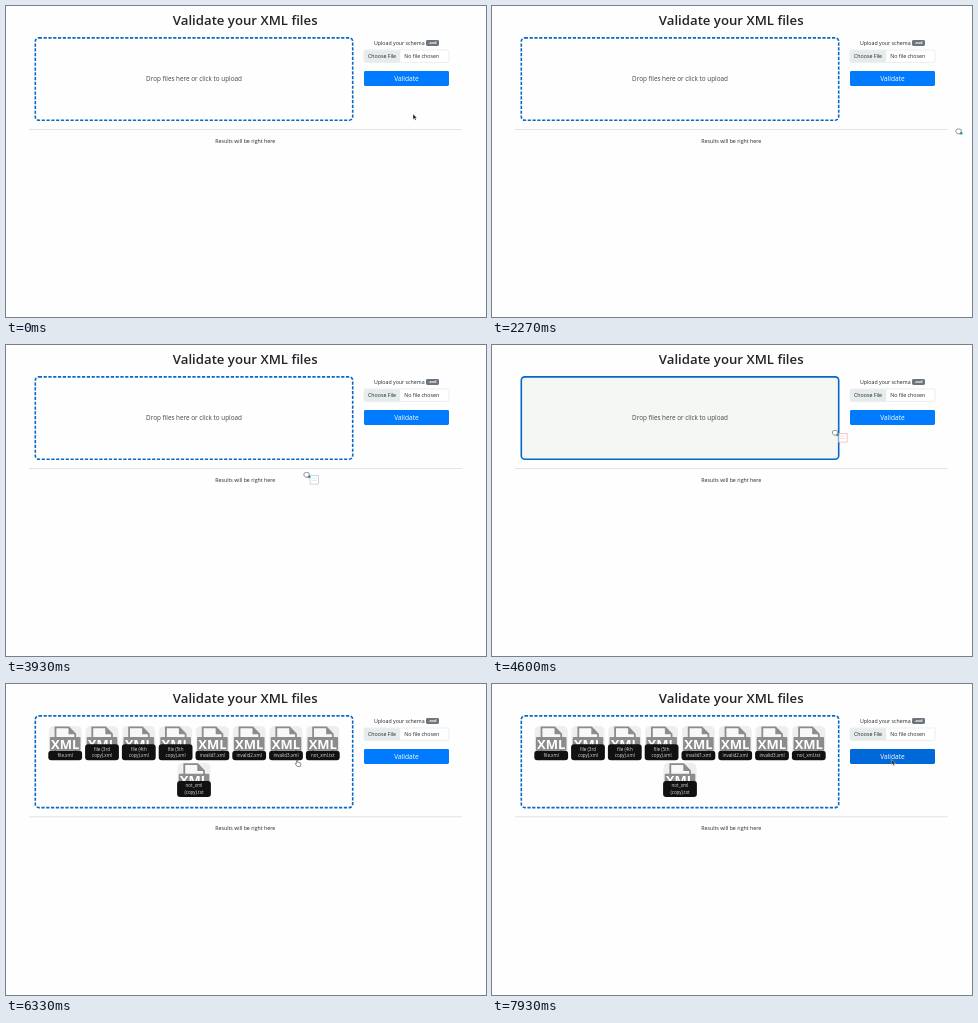
Write an HTML page that moves like this. It is 480x311 px and loops after 8000 ms.

```html
<!DOCTYPE html>
<html lang="en">
<head>
<meta charset="utf-8">
<title>Validate XML</title>
<style>
  html, body { margin: 0; width: 100%; height: 100%; overflow: hidden; background: #fefefe; }
  svg { display: block; width: 100vw; height: 100vh; }
  text { font-family: "Open Sans", "Noto Sans", sans-serif; font-size: 5.25px; fill: #212529; }
  .mid { text-anchor: middle; }
  .title { font-size: 13.2px; font-weight: 600; }
  .hint { font-size: 6.35px; fill: #444; }
  .badge { font-size: 4.1px; font-weight: 700; fill: #fff; }
  .action { font-size: 6.6px; fill: #fff; }
  .name { font-size: 4.5px; fill: #ddd; }
  .xml { font-size: 13px; font-weight: 700; fill: #fff; }
</style>
</head>
<body>
<svg viewBox="0 0 480 311">
  <text class="mid title" x="239.2" y="18.6">Validate your XML files</text>

  <rect id="zone" x="29.3" y="31.9" width="317.4" height="82.4" rx="3.5" stroke="#0668c8" stroke-width="1.6"/>
  <text id="hint" class="mid hint" x="188" y="75.3">Drop files here or click to upload</text>
  <g id="files"></g>

  <g id="below">
    <path d="M23 123.5H456" stroke="#e4e4e4"/>
    <text class="mid" x="239.2" y="137.2">Results will be right here</text>
  </g>

  <text x="368" y="39">Upload your schema</text>
  <rect x="420" y="34" width="13" height="6" rx="1.4" fill="#6c757d"/>
  <text class="mid badge" x="426.5" y="38.4">.xsd</text>
  <rect x="358" y="44" width="85" height="12.4" rx="1.5" fill="#fff" stroke="#dde1e5" stroke-width=".6"/>
  <rect x="358.2" y="44.2" width="36" height="12" rx="1.2" fill="#e6ebec"/>
  <text x="362" y="52.1">Choose File</text>
  <text x="398.3" y="52.1">No file chosen</text>
  <rect id="button" x="358" y="65" width="85" height="15" rx="1.4"/>
  <text class="mid action" x="400.5" y="74.8">Validate</text>

  <g id="cursor">
    <g id="ghost">
      <rect x="4" y="2.3" width="8.6" height="8.8" fill="#fff" fill-opacity=".75" stroke-width=".6"/>
      <path d="M5.5 5H11M5.5 7.5H11" stroke-width=".5" opacity=".6"/>
    </g>
    <path id="arrow" d="M0 0V5.4L1.3 4.3 2.2 6.2 3.2 5.7 2.3 3.9H4Z" fill="#222" stroke="#fff" stroke-width=".35"/>
    <path id="hand" d="M-.6 .2Q0 -.6 .6 .2V2.2L3 2.8Q4 3 3.8 4.2L3.2 6.4H.1L-1.9 3.8Q-1.9 2.9 -.6 3.6Z" fill="#fff" stroke="#444" stroke-width=".6"/>
    <g id="fist">
      <path d="M-1.8 .2Q-.8 -.8 .3 -.4Q1.8 -1 3.2 .3V3L2.4 4.2H-.6L-2.2 2.2Z" fill="#fff" stroke="#666" stroke-width=".7"/>
      <circle cx="3.2" cy="3.8" r="1.4" fill="#2a9dab"/>
    </g>
  </g>
</svg>
<script>
const LOOP = 8000, STEP = 200 / 3, LEG = 460;
const LEAVE = 1270, GRAB = 2260, POINT = 5390, DROP = 5900;
const $ = id => document.getElementById(id);
const show = (id, on) => $(id).setAttribute("visibility", on ? "visible" : "hidden");

// Pointer stops: arrival time, x, y
const stops = [
  [0, 407, 108], [430, 240, 14], [600, 32, 66], [870, 213, 131], [1270, 444, 172],
  [2270, 466, 123.5], [2600, 372, 108], [3070, 276, 91.5], [3930, 300, 128], [4400, 362, 104],
  [4600, 342.5, 86], [5000, 166, 74], [5400, 242, 73.5], [6330, 291, 76], [6700, 436, 50],
  [7250, 103, 62], [7860, 399.5, 75.5]
];

// Rest at each stop, then ease to the next in at most LEG ms
function pointer(t) {
  const i = stops.findIndex(s => s[0] > t);
  if (i < 0) return stops.at(-1).slice(1);
  const [t0, x0, y0] = stops[i - 1], [t1, x1, y1] = stops[i];
  const start = Math.max(t0, t1 - LEG);
  const k = Math.max(0, (t - start) / (t1 - start)), e = k * k * (3 - 2 * k);
  return [x0 + (x1 - x0) * e, y0 + (y1 - y0) * e];
}

const names = ["file.xml", ..."345".split("").map(n => `file (${n}${n === "3" ? "rd" : "th"}|copy).xml`),
  ..."123".split("").map(n => `invalid${n}.xml`), "not_xml.txt", "not_xml|(copy).txt"];

function thumb(name, i) {
  const lines = name.split("|").reverse(), height = 2.8 + 6.6 * lines.length;
  const x = i < 8 ? 59.2 + i * 36.8 : 188, y = i < 8 ? 0 : 36.8;
  const label = lines.map((s, n) => `<text class="mid name" y="${73.2 - 6.6 * n}">${s}</text>`).join("");
  return `<g transform="translate(${x} ${y})">
    <rect x="-16.5" y="42" width="33" height="33.5" rx="5" fill="#eee"/>
    <path d="M-9.7 75V43.4H3.5L10 50V75Z" fill="#f8f8f8" stroke="#8c8c8c" stroke-width="1.8"/>
    <path d="M3.3 43V50.2H10.5Z" fill="#8c8c8c"/>
    <rect x="-15.3" y="53" width="30.6" height="13.6" rx="1" fill="#8c8c8c"/>
    <text class="mid xml" y="64.5">XML</text>
    <rect x="-16.9" y="${76.2 - height}" width="33.8" height="${height}" rx="3" fill="#111"/>${label}</g>`;
}
$("files").innerHTML = names.map(thumb).join("");

function draw(now) {
  const t = Math.floor((now % LOOP + 10) / STEP) * STEP;
  const [x, y] = pointer(t);
  const drag = t >= GRAB && t < DROP, done = t >= DROP;
  const grow = done ? 9.3 : 0;
  const inZone = x > 28 && x < 348 && y > 31 && y < 115 + grow;
  const inButton = !drag && x > 358 && x < 443 && y > 65 && y < 80;
  const visible = t < LEAVE || t >= GRAB;
  const fist = drag && t < POINT;
  const over = drag && inZone;

  const zone = $("zone");
  zone.setAttribute("height", 82.4 + grow);
  zone.setAttribute("fill", over ? "#f5f7f5" : "#fefefe");
  zone.setAttribute("stroke-dasharray", over ? "none" : "3.2 1.6");
  show("hint", !done);
  show("files", done);
  $("below").setAttribute("transform", `translate(0 ${grow})`);
  $("button").setAttribute("fill", inButton ? "#0069d9" : "#007bff");

  $("cursor").setAttribute("transform", `translate(${x} ${y})`);
  show("arrow", visible && !fist && !inZone);
  show("hand", visible && !fist && inZone);
  show("fist", fist);
  show("ghost", drag && t > GRAB + STEP);
  $("ghost").setAttribute("stroke", !fist ? "#c4c4c4" : t > 4000 ? "#e9a5a0" : "#a9bccb");
}

function frame() {
  draw(performance.now());
  requestAnimationFrame(frame);
}
frame();
</script>
</body>
</html>
```
